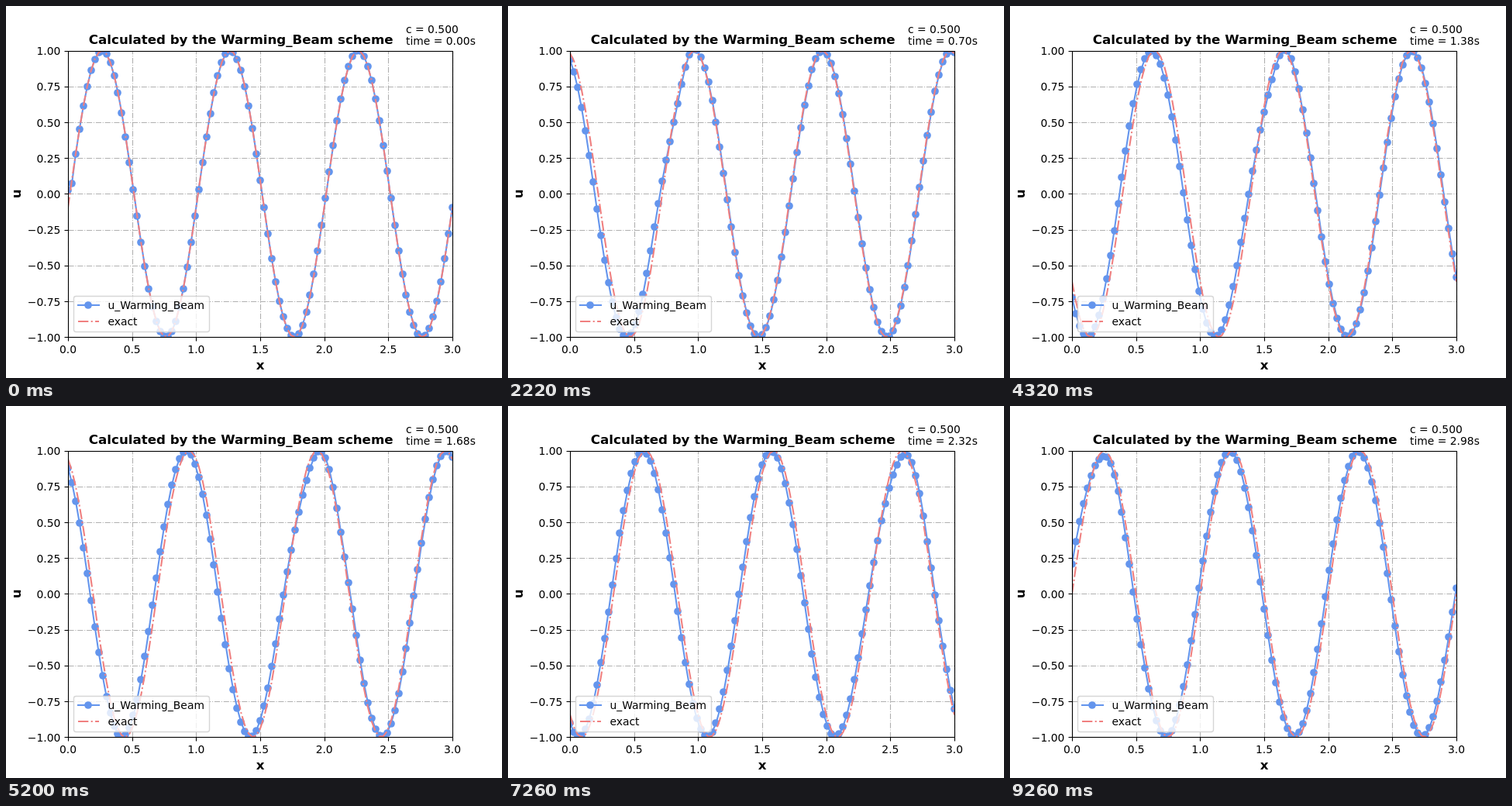
An HTML page with a canvas that plays this animation: 640 by 480 pixels, repeating every 9280 ms.

```html
<!DOCTYPE html>
<html lang="en">
<head>
<meta charset="utf-8">
<title>Advection of a sine wave</title>
<style>
  html, body { margin: 0; width: 100%; height: 100%; overflow: hidden; background: #fff; }
  canvas { display: block; }
</style>
</head>
<body>
<canvas id="plot" width="640" height="480"></canvas>
<script>
const ctx = document.getElementById('plot').getContext('2d');

// Plot box and units
const L = 80, R = 576, T = 57.6, B = 427.2;
const PT = 100 / 72;
const THIN = 0.8 * PT, THICK = 1.5 * PT;
const BLUE = '#6495ed', CORAL = '#f08080';
const px = x => L + (R - L) * x / 3;
const py = u => (T + B) / 2 - (B - T) / 2 * u;
const snap = v => Math.round(v) + 0.5;

// Second-order upwind scheme on a periodic grid
const POINTS = 101, DX = 0.03, C = 0.5, DT = C * DX, STEPS = 200;
const grid = Array.from({ length: POINTS }, (_, i) => i * DX);
const wave = t => grid.map(x => Math.sin(2 * Math.PI * (x - t)));
const advance = u => u.map((v, i) => {
  const a = u.at(i - 1), b = u.at(i - 2);
  return v - C * (v - a) - C * (1 - C) / 2 * (v - 2 * a + b);
});
const states = [advance(wave(0))];
while (states.length < STEPS) states.push(advance(states.at(-1)));

function stroke(points, color, width, dashed) {
  ctx.beginPath();
  points.forEach(([x, y]) => ctx.lineTo(x, y));
  ctx.strokeStyle = color;
  ctx.lineWidth = width;
  ctx.lineJoin = 'round';
  ctx.lineCap = dashed ? 'butt' : 'square';
  ctx.setLineDash(dashed ? [6.4, 1.6, 1, 1.6].map(d => d * width) : []);
  ctx.stroke();
}

function dot(x, y) {
  ctx.beginPath();
  ctx.arc(Math.round(x), Math.round(y), 3.5 * PT, 0, 2 * Math.PI);
  ctx.fillStyle = BLUE;
  ctx.fill();
}

function text(s, x, y, align = 'left', font = `${10 * PT}px`) {
  ctx.font = `${font} "DejaVu Sans", sans-serif`;
  ctx.textAlign = align;
  ctx.fillStyle = '#000';
  ctx.fillText(s, x, y);
}
const BOLD = `bold ${12 * PT}px`;

function drawAxes() {
  const left = snap(L), bottom = snap(B);
  for (let i = 0; i <= 6; i++) {
    const x = snap(px(i / 2));
    stroke([[x, bottom], [x, snap(T)]], '#b0b0b0', THIN, true);
    ctx.lineCap = 'butt';
    tick([[x, bottom], [x, bottom + 5]]);
    text((i / 2).toFixed(1), px(i / 2), 448, 'center');
  }
  for (let i = -4; i <= 4; i++) {
    const v = i / 4, y = snap(py(v));
    stroke([[left, y], [snap(R), y]], '#b0b0b0', THIN, true);
    tick([[left, y], [left - 5, y]]);
    text((v < 0 ? '\u2212' : '') + Math.abs(v).toFixed(2), 70.3, Math.round(py(v) + 5.5), 'right');
  }
}

function tick([[x0, y0], [x1, y1]]) {
  ctx.beginPath();
  ctx.moveTo(x0, y0);
  ctx.lineTo(x1, y1);
  ctx.strokeStyle = '#000';
  ctx.lineWidth = THIN;
  ctx.lineCap = 'butt';
  ctx.setLineDash([]);
  ctx.stroke();
}

function drawCurves(n) {
  const path = u => u.map((v, i) => [px(grid[i]), py(v)]);
  const numeric = path(states[n]);
  ctx.save();
  ctx.beginPath();
  ctx.rect(80, 58, 497, 370);
  ctx.clip();
  stroke(numeric, BLUE, THICK);
  numeric.forEach(p => dot(...p));
  stroke(path(wave((n + 1) * DT)), CORAL, THICK, true);
  ctx.restore();
}

function drawLegend() {
  ctx.beginPath();
  ctx.roundRect(87.5, 374.5, 175, 46, 2.8);
  ctx.fillStyle = 'rgba(255,255,255,0.8)';
  ctx.fill();
  ctx.strokeStyle = 'rgba(204,204,204,0.8)';
  ctx.lineWidth = PT;
  ctx.setLineDash([]);
  ctx.stroke();
  stroke([[93, 386], [120, 386]], BLUE, THICK);
  dot(106.4, 386);
  stroke([[93, 407], [120, 407]], CORAL, THICK, true);
  text('u_Warming_Beam', 131.4, 391);
  text('exact', 131.4, 412);
}

function drawLabels(n) {
  text('Calculated by the Warming_Beam scheme', 303.2, 49, 'center', BOLD);
  text('x', 328, 469, 'center', BOLD);
  ctx.save();
  ctx.translate(19, 242.4);
  ctx.rotate(-Math.PI / 2);
  text('u', 0, 0, 'center', BOLD);
  ctx.restore();
  text('c = 0.500', 516, 35);
  text(`time = ${(n * DT).toFixed(2)}s`, 516, 50);
}

function draw(n) {
  ctx.fillStyle = '#fff';
  ctx.fillRect(0, 0, 640, 480);
  drawAxes();
  drawCurves(n);
  ctx.lineJoin = 'miter';
  ctx.strokeStyle = '#000';
  ctx.lineWidth = THIN;
  ctx.setLineDash([]);
  ctx.strokeRect(snap(L), snap(T), R - L, snap(B) - snap(T));
  drawLabels(n);
  drawLegend();
}

// Steps come in threes, held for 20, 100 and 20 ms
function stepAt(ms) {
  const t = ms % 9280, r = t % 140;
  return 3 * Math.floor(t / 140) + (r < 20 ? 0 : r < 120 ? 1 : 2);
}

const start = performance.now();
let shown = -1;
function tickFrame() {
  const n = stepAt(performance.now() - start);
  if (n !== shown) draw(shown = n);
  requestAnimationFrame(tickFrame);
}
tickFrame();
</script>
</body>
</html>
```
